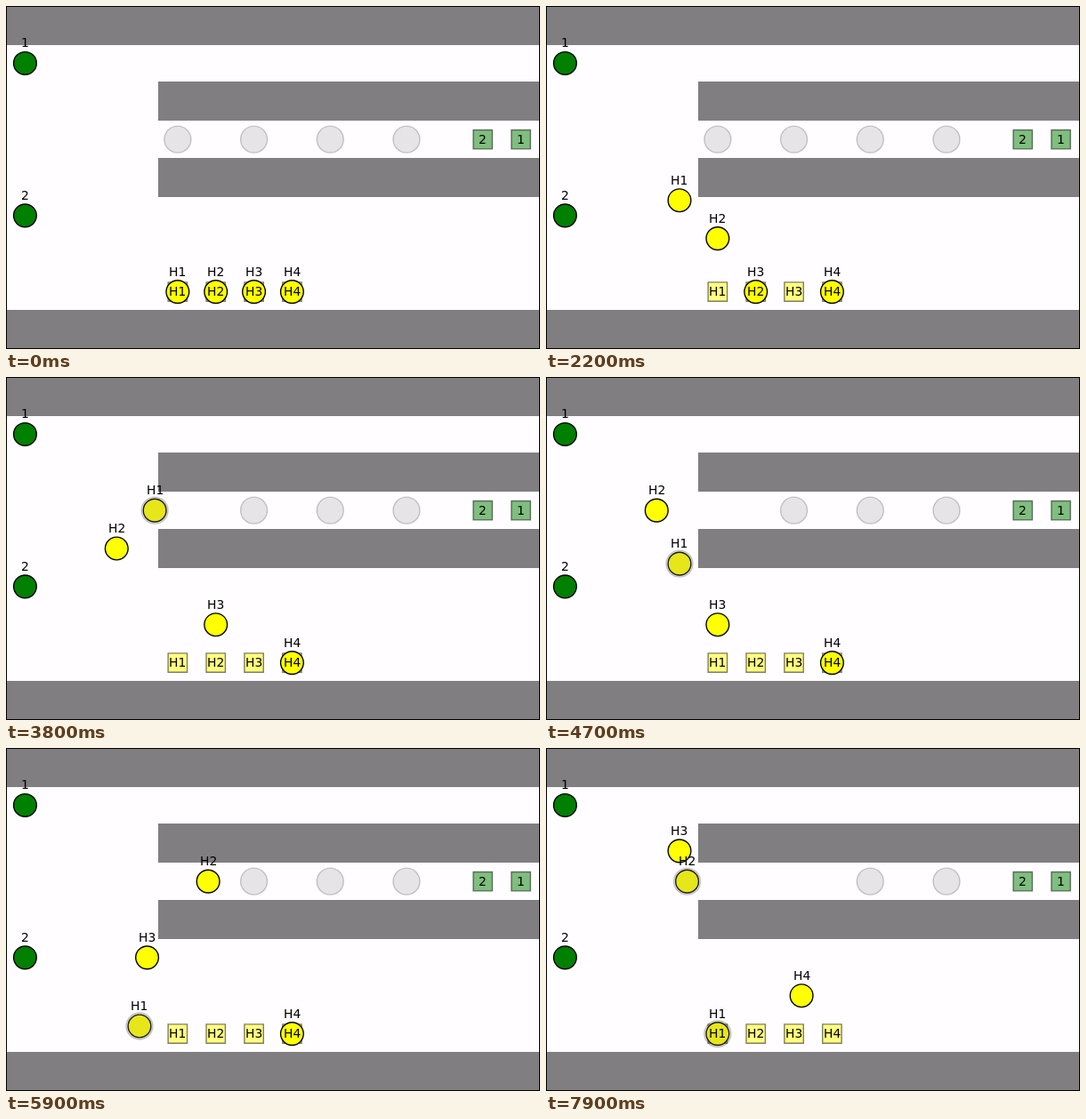
An HTML page with a canvas that plays this animation: 600 px wide and 386 px high, repeating every 8 s.

```html
<!DOCTYPE html>
<html lang="en">
<head>
<meta charset="utf-8">
<title>Grid agents</title>
<style>
  html, body { margin: 0; width: 600px; height: 386px; overflow: hidden; }
  canvas { display: block; }
</style>
</head>
<body>
<canvas id="stage" width="600" height="386"></canvas>
<script>
const ctx = document.getElementById('stage').getContext('2d');
const CELL = 600 / 14, LOOP = 8000, TICK = 100, TICKS_PER_MOVE = 5;
const LINE = 1.39, YELLOW = '#ffff00', GREEN = '#008000', GRAY = '#807e80';
const DIRS = { U: [0, -1], D: [0, 1], L: [-1, 0], R: [1, 0], '.': [0, 0] };

const px = col => (col + 0.5) * CELL;
const py = row => (row + 0.5) * CELL + 0.15;

// One letter per move; a dot means wait.
const agents = [
  { name: '1', col: 0, row: 1, color: GREEN, moves: '' },
  { name: '2', col: 0, row: 5, color: GREEN, moves: '' },
  { name: 'H1', col: 4, row: 7, color: YELLOW, moves: 'U.ULUURLDDDDR...' },
  { name: 'H2', col: 5, row: 7, color: YELLOW, moves: '.U.LULULURRRRLLL' },
  { name: 'H3', col: 6, row: 7, color: YELLOW, moves: '..L...U.L.ULUU.U' },
  { name: 'H4', col: 7, row: 7, color: YELLOW, moves: '............U..L' }
];
const goals = [
  { name: '1', col: 13, row: 3, color: GREEN },
  { name: '2', col: 12, row: 3, color: GREEN },
  ...agents.slice(2).map(({ name, col, row, color }) => ({ name, col, row, color }))
];
// A pod follows its carrier from the given move on.
const pods = [
  { col: 4, row: 3, carrier: agents[2], from: 7 },
  { col: 6, row: 3, carrier: agents[3], from: 13 },
  { col: 8, row: 3 },
  { col: 10, row: 3 }
];

function position(agent, step) {
  let { col, row } = agent;
  [...agent.moves].forEach((move, i) => {
    const part = Math.min(1, Math.max(0, step - i));
    col += DIRS[move][0] * part;
    row += DIRS[move][1] * part;
  });
  return { col, row };
}

function paint(color, alpha) {
  ctx.globalAlpha = alpha;
  ctx.fillStyle = color;
  ctx.fill();
  ctx.stroke();
  ctx.globalAlpha = 1;
}

function circle({ col, row }, radius, color, alpha) {
  ctx.beginPath();
  ctx.arc(px(col), py(row), radius * CELL, 0, 2 * Math.PI);
  paint(color, alpha);
}

function square({ col, row, color }) {
  const side = CELL / 2;
  ctx.beginPath();
  ctx.rect(px(col) - side / 2, py(row) - side / 2, side, side);
  paint(color, 0.5);
}

function wall(col, row) {
  const x = Math.round(col * CELL - 0.7);
  const top = Math.round(row * CELL - 0.55);
  const bottom = Math.round((row + 1) * CELL + 0.85);
  ctx.fillStyle = GRAY;
  ctx.fillRect(x, top, 600 - x, bottom - top);
}

function text(label, { col, row }, dy) {
  const left = px(col) - ctx.measureText(label).width / 2;
  ctx.fillStyle = '#000';
  ctx.fillText(label, Math.round(left), Math.round(py(row) + dy));
}

function draw(time) {
  const step = Math.floor(time % LOOP / TICK) / TICKS_PER_MOVE;
  const places = agents.map(agent => position(agent, step));

  ctx.fillStyle = '#fffdff';
  ctx.fillRect(0, 0, 600, 386);
  [[0, 0], [4, 2], [4, 4], [0, 8]].forEach(([col, row]) => wall(col, row));
  ctx.strokeStyle = '#000';
  ctx.lineWidth = 1;
  ctx.strokeRect(0.5, 0.5, 599, 385);

  ctx.lineWidth = LINE;
  goals.forEach(square);
  agents.forEach((agent, i) => circle(places[i], 0.3, agent.color, 1));
  pods.forEach(pod => {
    const carried = pod.carrier && step >= pod.from;
    circle(carried ? position(pod.carrier, step) : pod, 0.35, '#808080', 0.2);
  });

  ctx.font = '13.89px "DejaVu Sans", sans-serif';
  goals.forEach(goal => text(goal.name, goal, 4.4));
  agents.forEach((agent, i) => text(agent.name, places[i], -18));
}

const start = performance.now();
function loop() {
  draw(performance.now() - start);
  requestAnimationFrame(loop);
}
loop();
</script>
</body>
</html>
```
